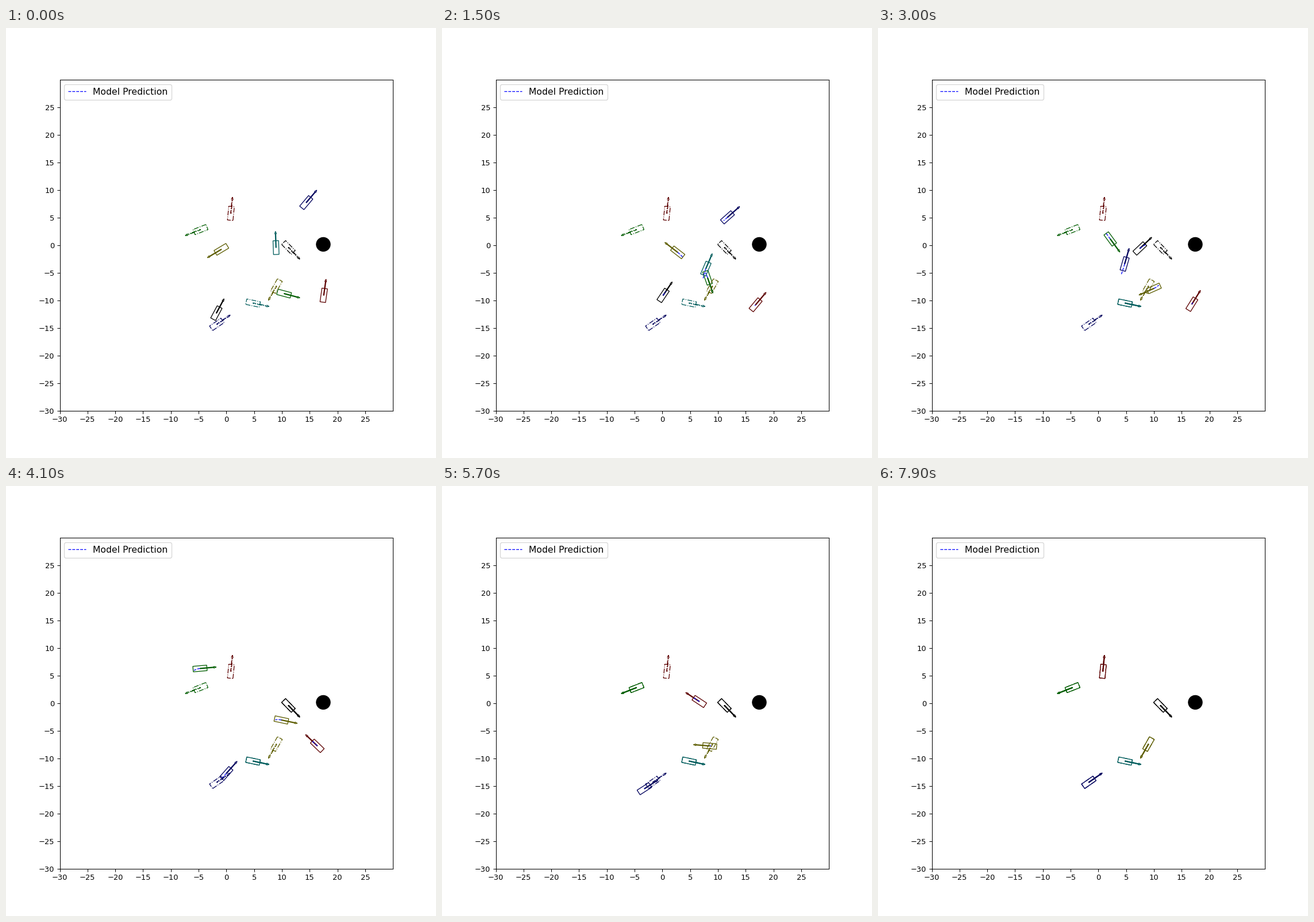
Write a matplotlib script that moves like this. It is 748 px wide and 748 px high and loops after 8000 ms.

```python
import numpy as np
import matplotlib.pyplot as plt
from matplotlib.animation import FuncAnimation
from matplotlib.patches import Circle, Polygon

FRAMES, INTERVAL = 80, 100
LENGTH, WIDTH = 2.5, 1.0
ARROW, HEAD = 2.5, 0.3
HORIZON = 1.7
DARK = 0.36

fig, ax = plt.subplots(figsize=(8, 8), dpi=93.5)
ax.set_xlim(-30, 30)
ax.set_ylim(-30, 30)
ax.set_xticks(np.arange(-30, 30, 5))
ax.set_yticks(np.arange(-30, 30, 5))


def unit(angle):
    return np.array([np.cos(angle), np.sin(angle)])


def box(pos, angle):
    along = unit(angle) * LENGTH / 2
    side = unit(angle + np.pi / 2) * WIDTH / 2
    return np.array([pos - along - side, pos + along - side,
                     pos + along + side, pos - along + side])


def draw_pose(pos, angle, color, style):
    body = ax.add_patch(Polygon(box(pos, angle), fill=False, ec=color,
                                lw=1, ls=style))
    arrow = ax.arrow(*pos, *(ARROW * unit(angle)), width=HEAD / 3,
                     head_width=HEAD, head_length=1.5 * HEAD,
                     fill=False, ec=color, lw=1, ls=style)
    return body, arrow


class Leg:
    """Near-circular curve between two poses, driven in one gear."""

    def __init__(self, start, end):
        self.t0, self.t1 = start[0], end[0]
        self.p0, self.p1 = np.array(start[1:3]), np.array(end[1:3])
        a0, a1 = np.radians([start[3], end[3]])
        turn = (a1 - a0 + np.pi) % (2 * np.pi) - np.pi
        chord = self.p1 - self.p0
        self.gear = 1 if chord @ unit(a0 + turn / 2) > 0 else -1
        pull = self.gear * np.hypot(*chord) / np.cos(turn / 4) ** 2
        self.m0, self.m1 = pull * unit(a0), pull * unit(a1)
        self.launch = self.brake = False

    def progress(self, t):
        s = min((t - self.t0) / (self.t1 - self.t0), 1)
        if self.launch and self.brake:
            return s * s * (3 - 2 * s)
        if self.launch:
            return s * s
        return 1 - (1 - s) ** 2 if self.brake else s

    def pose(self, t):
        u = self.progress(t)
        chord = self.p1 - self.p0
        pos = (self.p0 + u * u * (3 - 2 * u) * chord
               + u * (1 - u) ** 2 * self.m0 - u * u * (1 - u) * self.m1)
        vel = (6 * u * (1 - u) * chord + (1 - u) * (1 - 3 * u) * self.m0
               + u * (3 * u - 2) * self.m1)
        return pos, np.arctan2(*(self.gear * vel[::-1]))


class Car:
    """Drives through key poses (frame, x, y, degrees); the last is its goal."""

    def __init__(self, color, *keys):
        self.legs = [Leg(a, b) for a, b in zip(keys, keys[1:])]
        self.legs[0].launch = self.legs[-1].brake = True
        for a, b in zip(self.legs, self.legs[1:]):
            a.brake = b.launch = a.gear != b.gear
        self.legs[-1].brake = True
        draw_pose(np.array(keys[-1][1:3]), np.radians(keys[-1][3]), color, "-.")
        self.body, self.arrow = draw_pose(*self.pose(0), color, "-")
        self.plan, = ax.plot([], [], "b--", lw=1)

    def pose(self, t):
        leg = next((g for g in self.legs if t < g.t1), self.legs[-1])
        return leg.pose(t)

    def show(self, t):
        pos, angle = self.pose(t)
        self.body.set_xy(box(pos, angle))
        dx, dy = ARROW * unit(angle)
        self.arrow.set_data(x=pos[0], y=pos[1], dx=dx, dy=dy)
        ahead = np.linspace(t, t + HORIZON, 6) if t else []
        path = np.array([self.pose(u)[0] for u in ahead]).reshape(-1, 2)
        self.plan.set_data(*path.T)


cars = [
    Car((0, 0, 0), (0, -1.8, -12.32, 62), (30, 7.47, -0.6, 43.5),
        (41, 11.17, -0.42, -46)),
    Car((0, 0, DARK), (0, 14.38, 7.71, 50), (30, 4.73, -3.41, 74),
        (54, -3.3, -15.55, 32), (79, -1.72, -14.35, 35)),
    Car((0, DARK, 0), (0, 10.39, -8.78, -15), (15, 8.14, -5.91, -71),
        (30, 2.14, 1.12, -54), (41, -4.75, 6.28, 5),
        (50, -5.83, 2.56, 163), (57, -4.66, 2.82, 201.6)),
    Car((0, DARK, DARK), (0, 8.94, -0.44, 92), (15, 7.83, -4.25, 67),
        (30, 4.8, -10.5, -12)),
    Car((DARK, 0, 0), (0, 17.53, -9.09, 82), (22, 16.36, -11.23, 39),
        (41, 16.37, -7.74, 136), (64, 1.88, 3.05, 154),
        (75, 0.81, 5.76, 84.5)),
    Car((DARK, DARK, 0), (0, -0.9, -0.76, 211), (15, 2.76, -1.31, 142),
        (30, 10, -7.84, 204), (41, 9.9, -3.05, -12),
        (50, 6.85, -5.91, 121), (64, 9.02, -7.42, 240.6)),
]

ax.add_patch(Circle((17.45, 0.14), 1.25, color="k"))
ax.legend([cars[0].plan], ["Model Prediction"], loc="upper left", fontsize=12)


def update(frame):
    for car in cars:
        car.show(frame)
    return []


anim = FuncAnimation(fig, update, frames=FRAMES, interval=INTERVAL,
                     init_func=lambda: update(0), repeat=True, repeat_delay=0)
plt.show()
```
